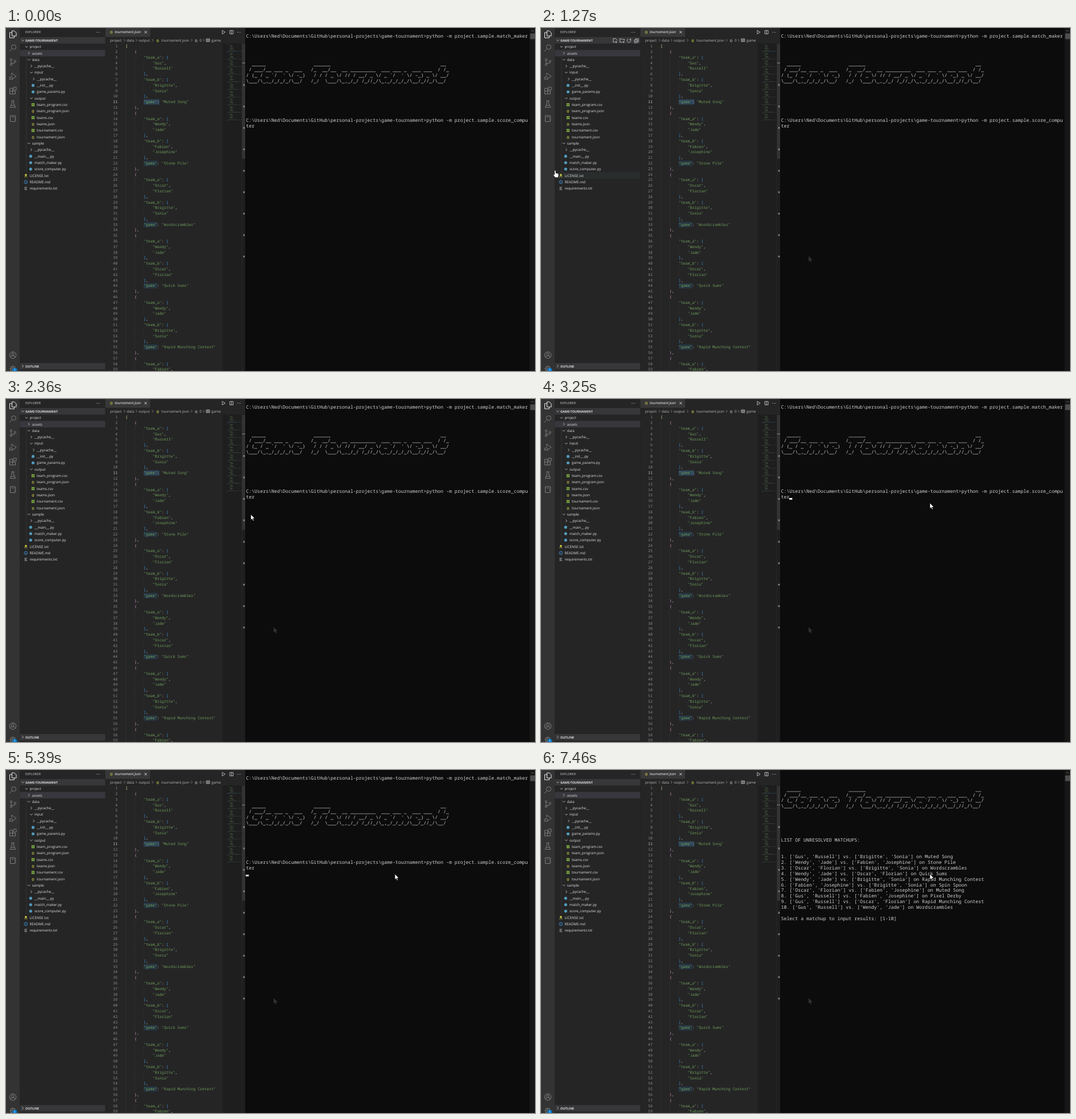
Write an HTML page that moves like this. It is 929 by 603 pixels and loops after 7.99 s.

```html
<!DOCTYPE html>
<html lang="en">
<head>
<meta charset="utf-8">
<title>Tournament editor and console</title>
<style>
html, body { margin: 0; width: 100%; height: 100%; overflow: hidden; background: #1e1e1e; }
svg { display: block; width: 929px; height: 603px; }
text { white-space: pre; text-rendering: geometricPrecision; }
.ui { font: 6.25px "Open Sans", sans-serif; }
.head { font: 5.6px "Open Sans", sans-serif; }
.bold { font: bold 5.5px "Open Sans", sans-serif; }
.tab { font: italic 6.25px "Open Sans", sans-serif; }
.code { font: 6.6px "Noto Sans Mono", monospace; }
.term { font: 8.25px "Noto Sans Mono", monospace; }
.line { fill: none; stroke-width: .9; }
</style>
</head>
<body>
<svg viewBox="0 0 929 603"></svg>
<script>
const svg = document.querySelector('svg');
const parts = [];
const add = s => parts.push(s);
const rect = (x, y, w, h, fill, id = '') =>
  add(`<rect x="${x}" y="${y}" width="${w}" height="${h}" fill="${fill}" ${id && `id="${id}"`}/>`);
const text = (x, y, s, cls, fill, anchor = 'start') =>
  add(`<text x="${x}" y="${y}" class="${cls}" fill="${fill}" text-anchor="${anchor}">${s}</text>`);
const stroke = (x, y, d, color = '#c5c5c5') =>
  add(`<path class="line" stroke="${color}" transform="translate(${x} ${y})" d="${d}"/>`);
const disc = (x, y, r, fill) => add(`<circle cx="${x}" cy="${y}" r="${r}" fill="${fill}"/>`);
const ring = (x, y, r) => `M${x - r} ${y}a${r} ${r} 0 1 0 ${2 * r} 0a${r} ${r} 0 1 0 ${-2 * r} 0`;
const ui = (x, y, s, fill = '#e0e0e0') => text(x, y + 2.2, s, 'ui', fill);
const braces = (x, y, fill = '#d8d84a') => text(x, y + 2.2, '{}', 'bold', fill, 'middle');
const DOWN = 'M-2.2-1.1L0 1.1 2.2-1.1', RIGHT = 'M-1.1-2.2L1.1 0-1.1 2.2';

const teams = {
  d: ['Gus', 'Russell'], n: ['Brigitte', 'Sonia'], k: ['Wendy', 'Jade'],
  m: ['Fabien', 'Josephine'], l: ['Oscar', 'Florian']
};
const matches = [
  ['d', 'n', 'Muted Song'], ['k', 'm', 'Stone Pile'], ['l', 'n', 'Wordscrambles'],
  ['k', 'l', 'Quick Sums'], ['k', 'n', 'Rapid Munching Contest'], ['m', 'n', 'Spin Spoon'],
  ['l', 'm', 'Muted Song'], ['d', 'm', 'Pixel Derby'], ['d', 'l', 'Rapid Munching Contest'],
  ['d', 'k', 'Wordscrambles']
].map(([a, b, game]) => ({ a: teams[a], b: teams[b], game }));

function activityBar() {
  rect(0, 0, 24.5, 603, '#333333');
  const icons = [
    [11, 'M-1.5-6h4l3.5 3.5V3h-7.5zM-1.5-3H-5.5V6.3H2.5V3'],
    [35, ring(1.5, -1.5, 4) + 'M-1.3 1.3L-6 6'],
    [60, ring(-3, -4.3, 1.7) + ring(-3, 4.3, 1.7) + ring(3.8, -1.5, 1.7) + 'M-3-2.6V2.6M3.8.2q0 2-2.5 2H-3'],
    [85, 'M-2-1V-6L6 0 0 4' + ring(-3, 3, 2.4) + 'M-6.5 1l1.5 1M-6.5 5.5l1.5-1M.5 5.5L-1 4.5'],
    [110, 'M-5.5-4H-.5V6H-5.5zM-5.5 1H4.5V6H-.5M1-6H6v5H1z'],
    [134, 'M-2.5-6h5M-1.5-6v4L-4.6 5.5h9.2L1.5-2V-6M-3 2H3'],
    [159, 'M-4.5-5H4V5.5H-4.5zM-2-2.5H1.5M4-3H5.5M4 0H5.5M4 3H5.5'],
    [575, ring(0, 0, 5.8) + ring(0, -1.6, 2.2) + 'M-4 4.2q0-3.4 4-3.4t4 3.4'],
    [599, ring(0, 0, 4) + ring(0, 0, 1.6) + 'M0-6v2M0 4v2M-6 0h2M4 0h2M-4.2-4.2l1.4 1.4M4.2-4.2L2.8-2.8M-4.2 4.2l1.4-1.4']
  ];
  icons.forEach(([y, d], i) => stroke(12, y, d, i ? '#858585' : '#ffffff'));
  disc(15.5, 601.5, 4, '#007acc');
  text(15.5, 603, '1', 'head', '#ffffff', 'middle');
}

// Each row: kind, depth, label. Kinds: v open, > closed, p py, c csv, j json, or a root file.
const tree = [
  'v0project', '>1assets', 'v1data', '>2__pycache__', 'v2input', '>3__pycache__', 'p3__init__.py',
  'p3game_params.py', 'v2output', 'c3team_program.csv', 'j3team_program.json', 'c3teams.csv',
  'j3teams.json', 'c3tournament.csv', 'j3tournament.json', 'v1sample', '>2__pycache__',
  'p2__main__.py', 'p2match_maker.py', 'p2score_computer.py', 'l0LICENSE.txt', 'i0README.md',
  't0requirements.txt'
];
const rowY = i => 33 + i * 11.32;

function explorer() {
  rect(24.5, 0, 150, 603, '#252526');
  text(34, 9.2, 'EXPLORER', 'head', '#cccccc');
  [159.5, 162, 164.5].forEach(x => disc(x, 7.5, .6, '#c5c5c5'));
  rect(24.5, 16, 150, 11.3, '#37373a');
  stroke(29.5, 21.7, DOWN);
  text(34, 23.8, 'GAME-TOURNAMENT', 'bold', '#dddddd');
  add('<g id="tools">');
  stroke(130, 22, 'M-3-3.5H1L3-1.5V0M-3-3.5V3H0M2 1V4.5M.2 2.7H4');
  stroke(142.5, 22, 'M-4-3H-1L0-2H4V0M-4-3V3H0M2.5 1V4.5M.7 2.7H4.4');
  stroke(154.5, 22, 'M2.5-2A3.2 3.2 0 1 1-1-3M3-4V-1.5H.5');
  stroke(167, 22, 'M-3-1H2V4H-3zM-1-1V-3H4V2H2M-2 1.5H1');
  add('</g>');
  rect(24.5, 38.6, 150, 11.3, '#37373d');
  rect(24.5, rowY(20) - 5.6, 150, 11.3, '#2a2d2e', 'hover');
  rect(35.6, 39, .6, 215, '#404040');
  tree.forEach((row, i) => {
    const kind = row[0], x = 41.5 + row[1] * 4.2, y = rowY(i), ix = x - 6.6;
    if (kind === 'v' || kind === '>') stroke(x - 5.5, y, kind === 'v' ? DOWN : RIGHT);
    if (kind === 'p') disc(ix, y, 2.6, '#519aba');
    if (kind === 'c') {
      rect(ix - 2.6, y - 2.6, 5.2, 5.2, '#8dc149');
      stroke(ix, y, 'M-2.6 0H2.6M0-2.6V2.6', '#3b5524');
    }
    if (kind === 'j') braces(ix, y);
    if (kind === 'l') {
      disc(ix, y - 1.2, 1.8, '#cbcb41');
      stroke(ix, y, 'M-.8 0L-1.8 3.2M.8 0L1.8 3.2', '#cbcb41');
    }
    if (kind === 'i') stroke(ix, y, ring(0, 0, 2.9) + 'M0-.5V1.8M0-1.9V-1.2', '#3f91d0');
    if (kind === 't') stroke(ix, y, 'M-2.4-2H2M-2.4 0H1.2M-2.4 2H2.4', '#b8bcbe');
    ui(x, y, row.slice(2));
  });
  rect(24.5, 589, 150, 11.4, '#37373a');
  stroke(29.5, 594.5, RIGHT);
  text(34, 596.6, 'OUTLINE', 'bold', '#dddddd');
}

function editorFrame() {
  rect(174.5, 0, 247, 603, '#252526');
  rect(380.5, 27, 41, 576, '#1e1e1e');
  rect(174.5, 0, 78.5, 15.5, '#383838');
  braces(185, 7);
  text(191, 9.4, 'tournament.json', 'tab', '#ffffff');
  stroke(245.3, 7.3, 'M-2-2L2 2M2-2L-2 2', '#eeeeee');
  stroke(382, 7.3, 'M-2.2-3.2L3 0-2.2 3.2z');
  stroke(396, 7.3, 'M-3-3H3V3H-3zM0-3V3');
  [406.7, 409.2, 411.7].forEach(x => disc(x, 7.5, .6, '#c5c5c5'));
  const grey = '#bcbcbc', y = 21.5;
  [[183, 'project'], [212, 'data'], [233, 'output'], [273, 'tournament.json'], [340, '0'], [361, 'game']]
    .forEach(([x, s]) => ui(x, y, s, grey));
  [208, 229, 257.5, 326, 347].forEach(x => stroke(x, y, RIGHT, '#8a8a8a'));
  braces(266.5, y);
  braces(334, y, '#c5c5c5');
  stroke(354.7, y, 'M-3-2.4H3V2.4H-3zM-1.7-.7H1.7M-1.7.8H1.7', '#c5c5c5');
}

const GREEN = '#6f9f59', PLAIN = '#d4d4d4', PINK = '#d69ac4', BLUE = '#3d9be0', GOLD = '#e3d9a0';

// Document as lines of [column, string, colour] pieces.
function documentLines() {
  const lines = [[[0, '[', GOLD]]];
  matches.forEach((m, i) => {
    lines.push([[4, '{', PINK]]);
    for (const side of ['a', 'b']) {
      lines.push([[8, `"team_${side}"`, GREEN], [16, ':', PLAIN], [18, '[', BLUE]]);
      m[side].forEach((name, j) => {
        const line = [[12, `"${name}"`, GREEN]];
        if (!j) line.push([14 + name.length, ',', PLAIN]);
        lines.push(line);
      });
      lines.push([[8, ']', BLUE], [9, ',', PLAIN]]);
    }
    lines.push([[8, '"game"', GREEN], [14, ':', PLAIN], [16, `"${m.game}"`, GREEN]]);
    lines.push([[4, '}', PINK], [5, i < 9 ? ',' : '', PLAIN]]);
  });
  lines.push([[0, ']', GOLD]]);
  return lines;
}

function editorCode() {
  const lines = documentLines(), charW = 3.96, left = 210;
  lines.slice(0, 59).forEach((line, i) => {
    const y = 32 + i * 9.793, current = i === 10;
    for (let col = 0; col < line[0][0]; col += 4)
      rect(left + col * charW, y - 4.9, .5, 9.8, '#383838');
    if (line[0][1] === '"game"')
      rect(left + 8 * charW, y - 4.4, charW * (current ? 7 : 6), 9, current ? '#2f4558' : '#273744');
    text(196, y + 2.3, i + 1, 'code', current ? '#d6d6d6' : '#8c8c8c', 'end');
    for (const [col, s, fill] of line) text(left + col * charW, y + 2.3, s, 'code', fill);
  });
  lines.forEach((line, i) => {
    const y = 28 + i * 1.22;
    for (const [col, s, fill] of line)
      add(`<rect x="${388 + col * .52}" y="${y}" width="${s.length * .52}" height=".7" fill="${fill}" opacity=".42"/>`);
    if (i % 11 === 10) rect(388, y + .4, 26, .6, i === 10 ? '#2f4a5c' : '#30363a');
  });
  rect(414, 27, .5, 576, '#303030');
  rect(414.5, 28, 6, 202, '#333334');
  rect(414.5, 61, 6, 1, '#8a8a8a');
  for (let k = 0; k < 9; k++) rect(416.6, 98.7 + k * 37.7, 2.6, 3, '#858585');
}

const TERM_X = 421.5, CHAR = 4.95;
const termY = row => 14 + row * 9.873;
const say = (row, s) => text(TERM_X, termY(row) + 3, s, 'term', '#d2d2d2');
const banner = [
  '  _____' + ' '.repeat(17) + '______' + ' '.repeat(39) + '__',
  " / ___/__ ___ _  ___   /_  __/__  __ _________  ___ ___ _  ___ ___  / /_",
  "/ (_ / _ `/  ' \\/ -_)   / / / _ \\/ // / __/ _ \\/ _ `/  ' \\/ -_) _ \\/ __/",
  "\\___/\\_,_/_/_/_/\\__/   /_/  \\___/\\_,_/_/ /_//_/\\_,_/_/_/_/\\__/_//_/\\__/"
];

function terminal() {
  rect(420, 0, 509, 603, '#0c0c0c');
  rect(919.5, 0, 9.5, 603, '#171717');
  rect(920.5, 9.5, 8.5, 10, '#4d4d4d');
  stroke(924.7, 5, 'M-2 1L0-1 2 1', '#777777');
  const prompt = 'C:\\Users\\Ned\\Documents\\GitHub\\personal-projects\\game-tournament>python -m project.sample.';
  add('<g id="before">');
  say(0, prompt + 'match_maker');
  banner.forEach((s, i) => say(5 + i, s));
  say(15, prompt + 'score_compu');
  say(16, 'ter');
  add('</g><g id="after">');
  banner.forEach((s, i) => say(2 + i, s));
  say(11, 'LIST OF UNRESOLVED MATCHUPS:');
  const list = pair => `['${pair.join("', '")}']`;
  matches.forEach((m, i) => say(14 + i, `${i + 1}. ${list(m.a)} vs. ${list(m.b)} on ${m.game}`));
  say(25, 'Select a matchup to input results: [1-10]');
  add('</g>');
  rect(0, 0, 5.3, 3, '#f2f2f2', 'caret');
}

function pointers() {
  const arrow = 'M0 0V9.6L2.2 7.6 3.8 11.2 5.3 10.5 3.7 7H6.8z';
  add(`<path id="ghost" d="${arrow}" transform="translate(470 401)" fill="#333333"/>`);
  add(`<g id="pointer" fill="#ffffff" stroke="#000000" stroke-width=".5"><path id="arrow" d="${arrow}"/>`);
  add('<path id="hand" d="M1.8 1Q2.9-.6 4 1V5L7.4 5.8Q9.2 6.2 9 8L8.2 12.8H3L-.4 8.6Q-.4 6.8 1.8 8.2z"/></g>');
}

activityBar();
explorer();
editorFrame();
editorCode();
terminal();
pointers();
svg.innerHTML = parts.join('');

const LOOP = 7990;
const path = [
  [790, 765, 518], [860, 640, 468], [930, 470, 401], [1000, 148, 275], [1070, 74, 262], [1130, 32, 253],
  [1200, 17, 250], [1270, 22, 250], [1340, 38, 251], [1410, 57, 251], [1480, 76, 251], [1550, 86, 250],
  [1610, 86, 248], [1950, 87, 248], [2020, 86, 247], [2220, 130, 243], [2290, 260, 225], [2360, 430, 203],
  [2430, 570, 186], [2500, 676, 174], [2700, 680, 180], [2770, 683, 183]
];
// Console caret: time, column, row (row 0 hides it).
const carets = [
  [0, 0, 0], [3250, 3, 16], [3780, 0, 0], [4310, 3, 16], [4380, 0, 17], [4840, 0, 0], [5390, 0, 17],
  [5590, 0, 26], [6450, 0, 0], [6930, 0, 26], [7460, 0, 0]
];
const $ = id => document.getElementById(id);
const show = (id, on) => $(id).style.display = on ? '' : 'none';
const latest = (steps, t) => steps.findLast(s => s[0] <= t);

function draw(t) {
  const spot = latest(path, t), [, col, row] = latest(carets, t);
  const inTree = t >= 1070 && t < 2290;
  show('before', t < 5590);
  show('after', t >= 5590);
  show('ghost', t >= 930);
  show('pointer', spot);
  show('hand', inTree);
  show('arrow', !inTree);
  show('tools', inTree);
  show('hover', inTree);
  if (spot) $('pointer').setAttribute('transform', `translate(${spot[1]} ${spot[2]})`);
  $('hover').setAttribute('y', rowY(t < 1610 ? 20 : 19) - 5.6);
  show('caret', row);
  $('caret').setAttribute('x', Math.floor(TERM_X + col * CHAR));
  $('caret').setAttribute('y', Math.round(termY(row) + 2.2));
}

const start = performance.now();
function tick() {
  draw((performance.now() - start) % LOOP);
  requestAnimationFrame(tick);
}
tick();
</script>
</body>
</html>
```
